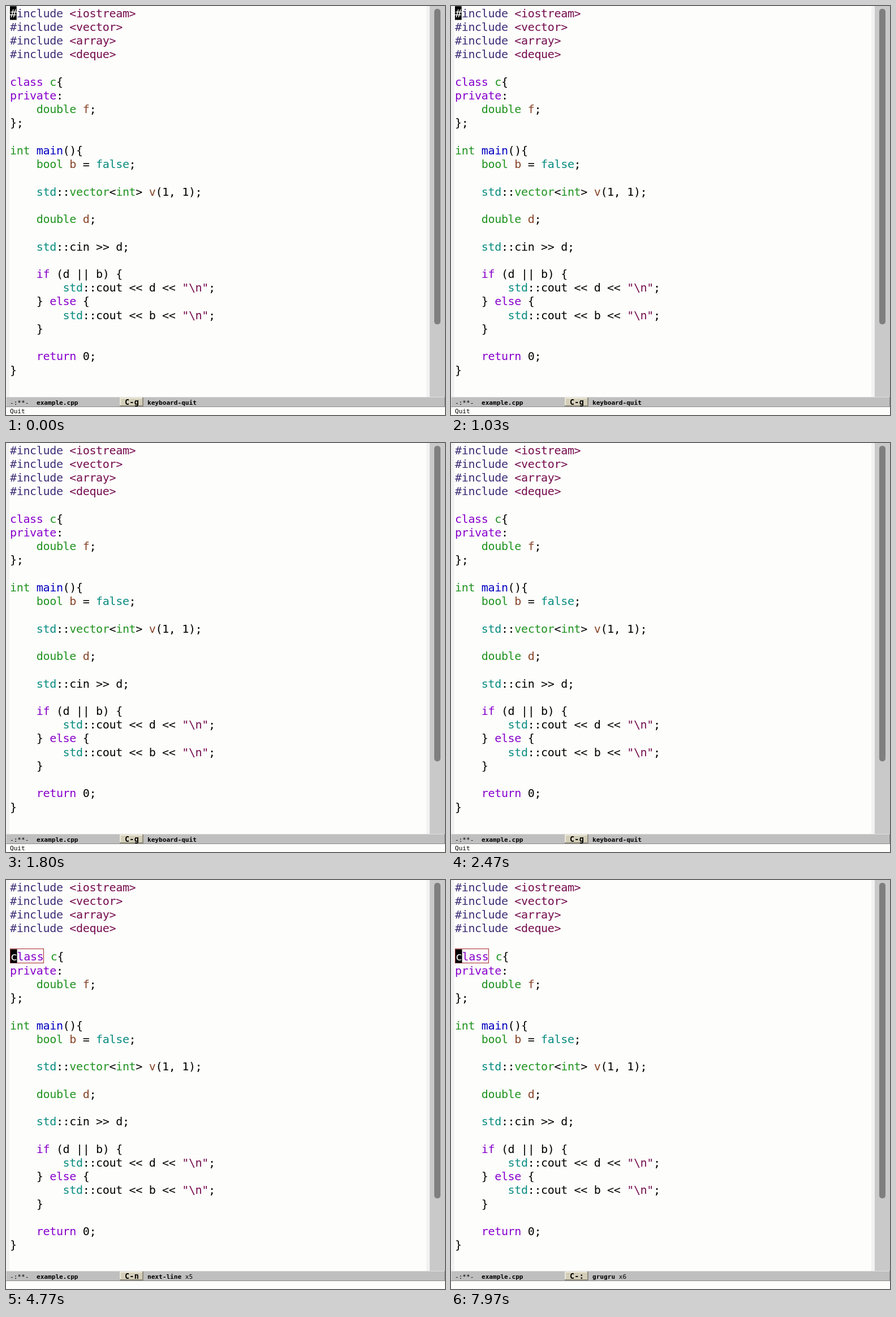
Write an HTML page with a canvas that moves like this. It is 776 px wide and 722 px high and loops after 8000 ms.

```html
<!DOCTYPE html>
<html lang="en">
<head>
<meta charset="utf-8">
<title>Editor</title>
<style>
  html, body { margin: 0; width: 100%; height: 100%; overflow: hidden; background: #fdfdfb; }
  canvas { display: block; }
</style>
</head>
<body>
<canvas id="stage" width="776" height="722"></canvas>
<script>
const ctx = document.getElementById('stage').getContext('2d');
const LOOP = 8000;
const MONO = '"DejaVu Sans Mono", monospace';
const PX = 0.8357;                       // one editor pixel on the stage
const CELL = 14 * PX, ROW = 29 * PX, LEFT = 7;
const PAPER = '#fdfdfb';
const CURSOR_ROW = 5;
const HIGHLIGHT_AT = 4400;
const NEXT_LINE = [2640, 2830, 3020, 3210, 3400];
const GRUGRU = [5280, 5800, 6300, 6740, 7160, 7560];

const COLORS = {
  p: '#3e2e78', s: '#750c4e', k: '#8700cc', t: '#1f931f',
  v: '#874428', c: '#088c80', f: '#0000c0', n: '#000'
};

// [x:word] marks a word with a color from COLORS
const CODE = String.raw`[p:#include] [s:<iostream>]
[p:#include] [s:<vector>]
[p:#include] [s:<array>]
[p:#include] [s:<deque>]

[k:class] [t:c]{
[k:private]:
    [t:double] [v:f];
};

[t:int] [f:main](){
    [t:bool] [v:b] = [c:false];

    [c:std]::[t:vector]<[t:int]> [v:v](1, 1);

    [t:double] [v:d];

    [c:std]::cin >> d;

    [k:if] (d || b) {
        [c:std]::cout << d << [s:"\n"];
    } [k:else] {
        [c:std]::cout << b << [s:"\n"];
    }

    [k:return] 0;
}`.split('\n');

function parse(line) {
  const chars = [];
  for (const [, color = 'n', word, plain] of line.matchAll(/\[(\w):(.*?)\]|([^\[]+)/g))
    for (const glyph of word ?? plain) chars.push({ glyph, color: COLORS[color] });
  return chars;
}

const LINES = CODE.map(parse);
const STRUCT_LINE = parse(CODE[CURSOR_ROW].replace('class', 'struct'));

function rect(x, y, w, h, color) {
  ctx.fillStyle = color;
  ctx.fillRect(x, y, w, h);
}

function cells(text, x, y, step, font, color = '#000') {
  ctx.font = font;
  ctx.fillStyle = color;
  [...text].forEach((glyph, i) => ctx.fillText(glyph, x + i * step, y));
}

function small(text, x, y, weight = '') {
  cells(text, x, y, 8 * PX, `${weight} 11.14px ${MONO}`);
}

function bevel(x, y, w, h, size, light, dark) {
  rect(x, y, w, size, light);
  rect(x, y, size, h, light);
  rect(x, y + h - size, w, size, dark);
  rect(x + w - size, y, size, h, dark);
}

const countBefore = (times, t) => times.filter(at => at <= t).length;

function stateAt(t) {
  const steps = countBefore(NEXT_LINE, t);
  const swaps = countBefore(GRUGRU, t);
  const lastKey = Math.max(-1040, ...[...NEXT_LINE, ...GRUGRU].filter(at => at <= t));
  return {
    row: steps,
    cursorOn: Math.floor((t - lastKey) / 500) % 2 === 0,
    boxed: t >= HIGHLIGHT_AT,
    word: swaps % 2 ? 'struct' : 'class',
    idle: !steps,
    key: swaps ? 'C-:' : steps ? 'C-n' : 'C-g',
    command: swaps ? 'grugru' : steps ? 'next-line' : 'keyboard-quit',
    repeats: swaps || steps
  };
}

function drawCode(s) {
  LINES.forEach((line, row) => {
    const inBoxRow = s.boxed && row === CURSOR_ROW;
    const chars = inBoxRow && s.word === 'struct' ? STRUCT_LINE : line;
    const top = row * ROW + 0.3 + (!s.boxed || row < CURSOR_ROW ? 0 : inBoxRow ? PX : 2 * PX);
    const shift = col => !inBoxRow ? 0 : col < s.word.length ? PX : 2 * PX;
    const hasCursor = s.cursorOn && row === s.row;

    if (inBoxRow) {
      ctx.strokeStyle = '#a52a2a';
      ctx.lineWidth = 1;
      ctx.strokeRect(7.5, 121.5, Math.round(s.word.length * CELL + PX), 25);
    }
    if (hasCursor) rect(LEFT + shift(0), top, CELL, ROW, '#000');
    chars.forEach(({ glyph, color }, col) => {
      const ink = hasCursor && col === 0 ? PAPER : color;
      cells(glyph, LEFT + col * CELL + shift(col), top + 23 * PX, CELL, `${24 * PX}px ${MONO}`, ink);
    });
  });
}

function drawFrame() {
  rect(0, 0, 776, 722, PAPER);
  rect(0, 0, 6, 690, '#f2f2f2');
  rect(743, 0, 6, 690, '#f2f2f2');
  rect(749, 0, 27, 690, '#c9c9c9');
  ctx.fillStyle = '#7f7f7f';
  ctx.beginPath();
  ctx.roundRect(757, 5, 11, 557, 5);
  ctx.fill();
}

function drawModeLine(s) {
  rect(0, 690, 776, 18, '#bfbfbf');
  bevel(0, 690, 776, 18, 1, '#dedede', '#8c8c8c');
  small('-:**-', LEFT, 703.6);
  small('example.cpp', 54, 703.6, 'bold');
  rect(201, 691, 42, 16, '#d3ceb9');
  bevel(201, 691, 42, 16, 2, '#ece8d8', '#8f8b7c');
  cells(s.key, 210, 703.6, 10 * PX, `bold 13.4px ${MONO}`);
  small(s.command, 250, 703.6, 'bold');
  if (s.repeats > 1) small('x' + s.repeats, 250 + (s.command.length + 1) * 8 * PX, 703.6);
  if (s.idle) small('Quit', LEFT, 718.7);
}

function render(now) {
  const state = stateAt(now % LOOP);
  drawFrame();
  drawCode(state);
  drawModeLine(state);
  requestAnimationFrame(render);
}
render(0);
</script>
</body>
</html>
```
